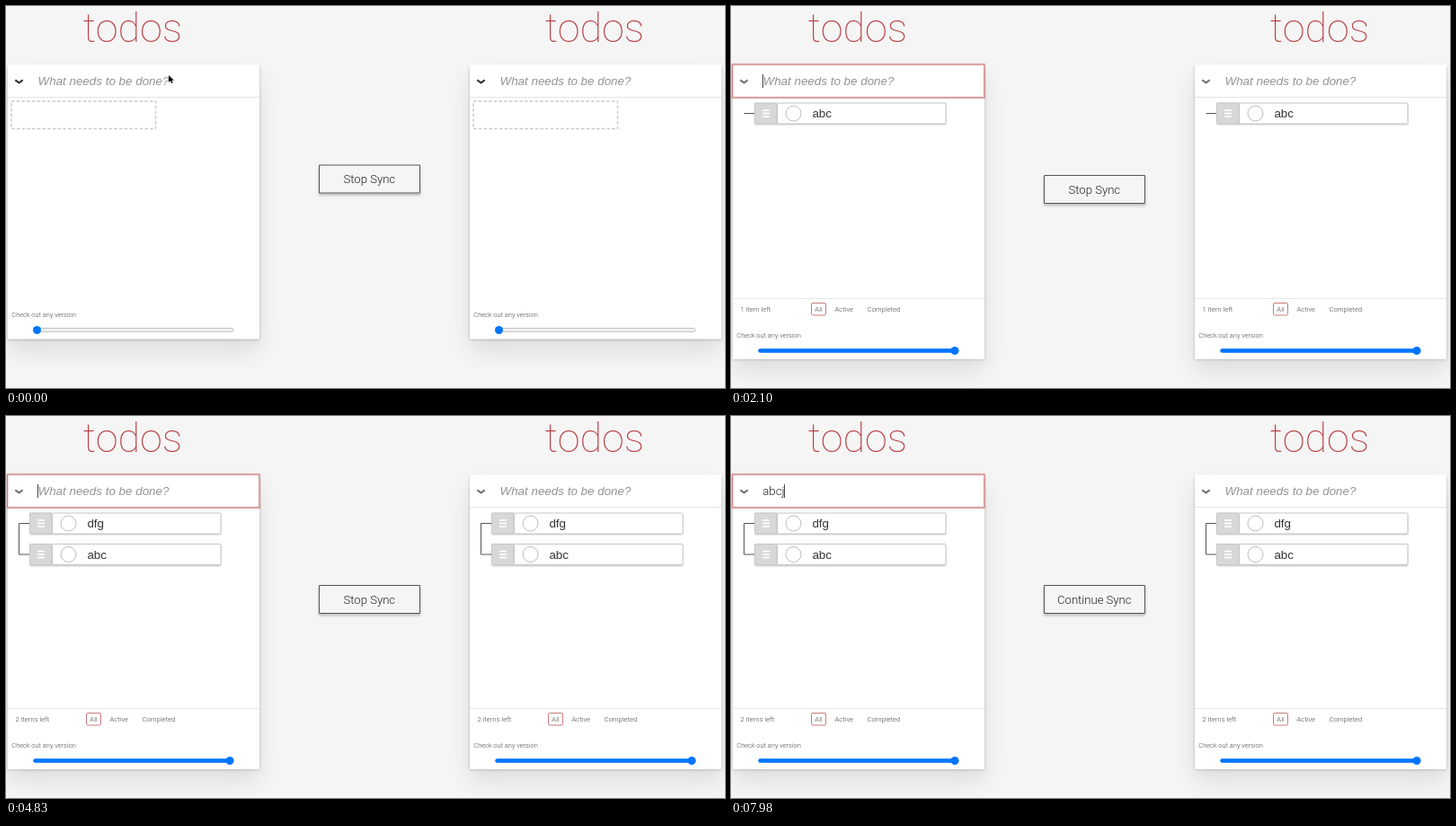
An HTML page with a canvas for the animation above (8000 ms loop, 800x425 px).

```html
<!DOCTYPE html>
<html lang="en">
<head>
<meta charset="utf-8">
<title>Synced todos</title>
<style>
  html, body { margin: 0; width: 100%; height: 100%; overflow: hidden; background: #f5f5f5; }
  canvas { display: block; }
</style>
</head>
<body>
<canvas id="stage" width="800" height="425"></canvas>
<script>
const ctx = document.getElementById('stage').getContext('2d');
const LOOP = 8000;
const LIGHT = 'Roboto, sans-serif';
const PLAIN = '"Liberation Sans", Arial, sans-serif';

// Timelines: [start in ms, value], each value holds until the next start.
const typed = [[0, ''], [1540, 'a'], [1820, 'abc'], [2100, ''], [3920, 'd'], [4200, 'df'],
  [4340, 'dfg'], [4760, ''], [7560, 'a'], [7700, 'ab'], [7840, 'abc'], [7980, 'abcj']];
const todos = [[0, []], [2100, ['abc']], [4760, ['dfg', 'abc']]];
const focus = [[0, false], [770, true], [6230, false], [6720, true]];
const caret = [[0, true], [1400, false], [1540, true], [2660, false], [3220, true],
  [5250, false], [5740, true], [7210, false], [7560, true]];
const pointerShown = [[0, true], [1540, false], [5670, true], [7560, false]];
const pointerPath = [[0, 181, 77], [5670, 181, 77], [5880, 389, 208.5], [6020, 391, 207],
  [6230, 391, 207], [6650, 136, 75.5]];

const valueAt = (line, t) => line.findLast(([start]) => start <= t)[1];

function pointAt(path, t) {
  const i = path.findLastIndex(([start]) => start <= t);
  const [t0, x0, y0] = path[i];
  const [t1, x1, y1] = path[i + 1] || [t0 + 1, x0, y0];
  const p = Math.min(1, (t - t0) / (t1 - t0));
  const eased = p * p * (3 - 2 * p);
  return [x0 + (x1 - x0) * eased, y0 + (y1 - y0) * eased];
}

function text(str, x, y, font, color, align = 'left') {
  ctx.font = font;
  ctx.fillStyle = color;
  ctx.textAlign = align;
  ctx.fillText(str, x, y);
}

function line(points, color, width = 1) {
  ctx.beginPath();
  points.forEach(([x, y]) => ctx.lineTo(x, y));
  ctx.strokeStyle = color;
  ctx.lineWidth = width;
  ctx.stroke();
}

function box(x, y, w, h, { fill, stroke, width = 1, radius = 0 }) {
  ctx.beginPath();
  ctx.roundRect(x, y, w, h, radius);
  if (fill) { ctx.fillStyle = fill; ctx.fill(); }
  if (stroke) { ctx.strokeStyle = stroke; ctx.lineWidth = width; ctx.stroke(); }
}

function circle(x, y, r) {
  ctx.beginPath();
  ctx.arc(x, y, r, 0, 2 * Math.PI);
}

function withShadow(dy, blur, alpha, draw) {
  ctx.save();
  ctx.shadowColor = `rgba(0,0,0,${alpha})`;
  ctx.shadowOffsetY = dy;
  ctx.shadowBlur = blur;
  draw();
  ctx.restore();
}

function drawInput(value, focused, caretOn, dim) {
  line([[2, 101.5], [282, 101.5]], '#e3e3e3');
  line([[10.3, 82.4], [14.5, 85.4], [18.7, 82.4]], dim ? '#737373' : '#333', 2);
  if (focused) {
    box(1.5, 65, 280.5, 37, { stroke: 'rgba(207,125,125,.35)', width: 2.5 });
    box(1.5, 65, 280.5, 37, { stroke: '#cf7d7d' });
  }
  const font = `300 13.2px ${LIGHT}`;
  if (value) text(value, 35.3, 88.3, font, '#222');
  else text('What needs to be done?', 35.5, 88.3, `italic 13.4px ${PLAIN}`, '#949494');
  if (focused && caretOn) {
    ctx.font = font;
    const x = Math.round(35.3 + ctx.measureText(value).width) + 0.5;
    line([[x, 76], [x, 91]], '#444');
  }
}

function drawItem(label, y) {
  withShadow(1, 2, 0.25, () => box(27, y - 12, 212, 23.5, { fill: '#fff' }));
  box(51.5, y - 11.5, 187.5, 23, { fill: '#fff', stroke: '#c6c6c6', radius: 1 });
  box(27, y - 12, 24, 23.5, { fill: '#d8d8d8' });
  box(26.5, y - 11.5, 24.5, 23, { stroke: '#c8c8c8' });
  for (const dy of [-3.5, 0, 3.5]) line([[35, y + dy], [43, y + dy]], '#fff', 1.6);
  circle(69.5, y, 8.5);
  ctx.strokeStyle = '#aaa';
  ctx.lineWidth = 0.8;
  ctx.stroke();
  text(label, 90.4, y + 4.6, `13.4px ${PLAIN}`, '#333');
}

function drawList(items) {
  if (!items.length) {
    ctx.setLineDash([3.5, 2.2]);
    box(6, 106, 160.5, 30.5, { stroke: '#c9c9c9', width: 1.5 });
    ctx.setLineDash([]);
    return;
  }
  const rowY = i => 119.5 + i * 34.5;
  line([[27, 119.5], [14.5, 119.5]], '#555');
  if (items.length > 1) line([[14.5, 119.5], [14.5, 154], [27, 154]], '#555');
  items.forEach((label, i) => drawItem(label, rowY(i)));

  const font = `300 7.7px ${LIGHT}`;
  line([[2, 325.5], [282, 325.5]], '#e6e6e6');
  text(`${items.length} item${items.length > 1 ? 's' : ''} left`, 10.5, 340, font, '#444');
  box(89.5, 330.5, 16, 13.5, { stroke: '#c87b7f', radius: 1.5 });
  text('All', 97.5, 340, font, '#444', 'center');
  text('Active', 115.5, 340, font, '#444');
  text('Completed', 151.5, 340, font, '#444');
}

function drawSlider(full, y) {
  text('Check out any version', 6.3, y - 14.5, `300 7.45px ${LIGHT}`, '#444');
  box(30.5, y - 2, 222.5, 4, full
    ? { fill: '#0075ff', stroke: '#0075ff', width: 0.6, radius: 2 }
    : { fill: '#efefef', stroke: '#b8b8b8', width: 0.8, radius: 2 });
  circle(full ? 249 : 34.5, y, 4.5);
  ctx.fillStyle = '#0075ff';
  ctx.fill();
}

function drawApp(x, items, value, focused, caretOn) {
  const full = items.length > 0;
  const height = full ? 327.5 : 305;
  const panel = () => box(2, 65.5, 280, height, { fill: '#fff' });
  ctx.save();
  ctx.translate(x, 0);
  text('todos', 141, 39.5, `200 45px ${LIGHT}`, '#b83f45', 'center');
  withShadow(13, 25, 0.1, panel);
  withShadow(1, 3, 0.22, panel);
  drawInput(value, focused, caretOn, full);
  drawList(items);
  drawSlider(full, full ? 383.5 : 360.5);
  ctx.restore();
}

function drawButton(label, y) {
  withShadow(2, 3, 0.25, () => box(348, y, 113, 32, { fill: '#f5f5f5' }));
  box(348.5, y + 0.5, 112, 31, { fill: '#f5f5f5', stroke: '#555' });
  text(label, 404.3, y + 20.6, `300 13.1px ${LIGHT}`, '#222', 'center');
}

function drawPointer(x, y, beam) {
  ctx.save();
  ctx.translate(x, y);
  if (beam) {
    const strokes = [[[0, -4.5], [0, 4.5]], [[-2, -4.5], [2, -4.5]], [[-2, 4.5], [2, 4.5]]];
    strokes.forEach(s => line(s, '#fff', 2));
    strokes.forEach(s => line(s, '#222', 1));
  } else {
    ctx.beginPath();
    [[0, 0], [0, 8], [1.9, 6.3], [3.2, 9], [4.5, 8.4], [3.3, 5.8], [5.8, 5.8]]
      .forEach(([px, py]) => ctx.lineTo(px, py));
    ctx.closePath();
    ctx.strokeStyle = '#fff';
    ctx.lineWidth = 1;
    ctx.stroke();
    ctx.fillStyle = '#000';
    ctx.fill();
  }
  ctx.restore();
}

function render(t) {
  const items = valueAt(todos, t);
  ctx.fillStyle = '#f5f5f5';
  ctx.fillRect(0, 0, 800, 425);
  drawApp(0, items, valueAt(typed, t), valueAt(focus, t), valueAt(caret, t));
  drawApp(514, items, '', false, false);
  drawButton(t < 6230 ? 'Stop Sync' : 'Continue Sync', items.length ? 188 : 176.5);
  if (valueAt(pointerShown, t)) {
    const [x, y] = pointAt(pointerPath, t);
    drawPointer(x, y, t >= 770 && x < 282 && y < 102);
  }
}

const begin = performance.now();
function tick() {
  render((performance.now() - begin) % LOOP);
  requestAnimationFrame(tick);
}
tick();
</script>
</body>
</html>
```
